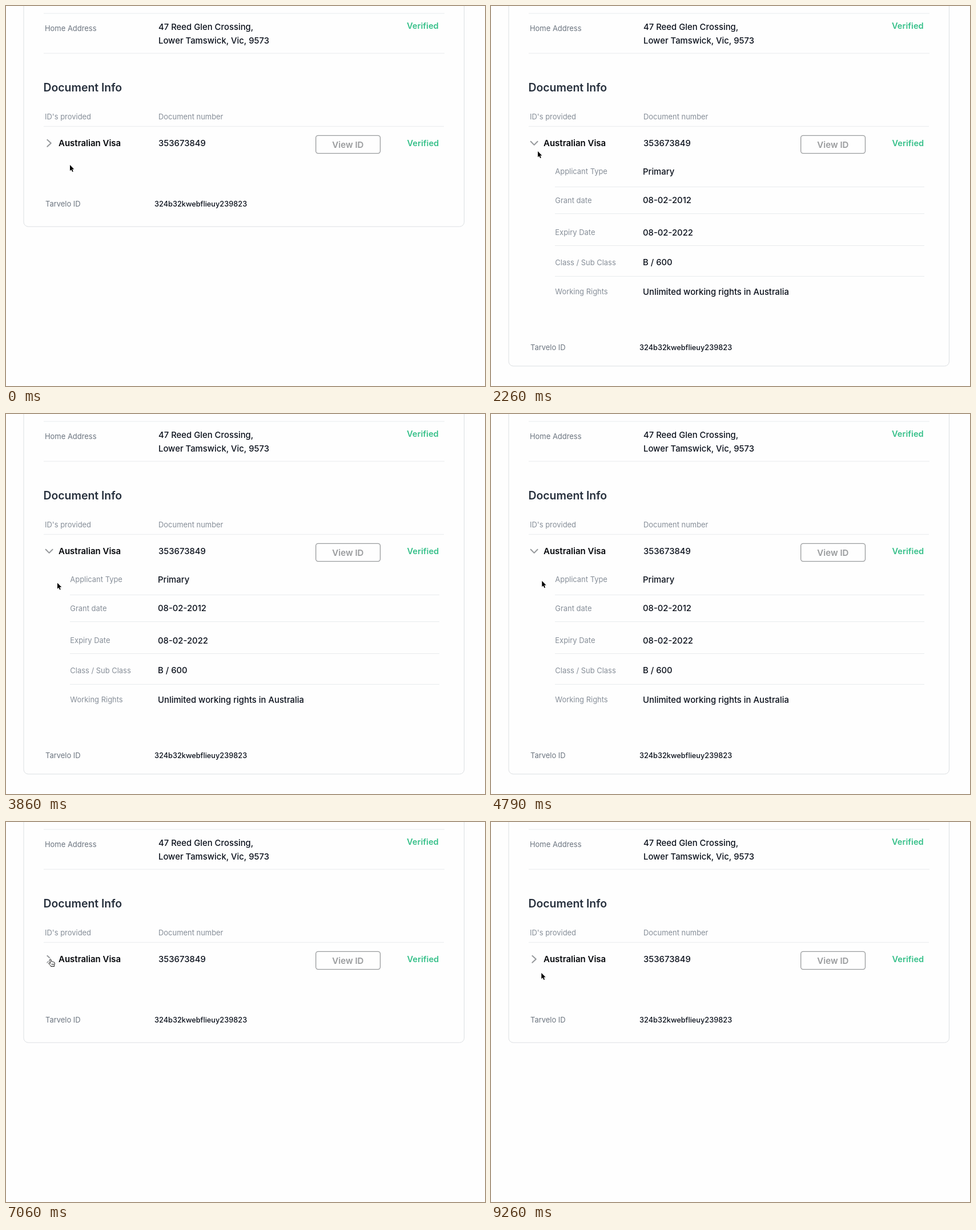
Animation of 839 by 667 pixels, one loop 9.33 s. Source, as an HTML page:

```html
<!DOCTYPE html>
<html lang="en">
<head>
<meta charset="utf-8">
<title>Document info</title>
<style>
  html, body { margin: 0; width: 100%; height: 100%; overflow: hidden; background: #fefefe; }
  svg { display: block; }
  text { font-family: Inter, "Open Sans", sans-serif; white-space: pre; }
  .label { font-size: 12.95px; fill: #868e98; }
  .dark { fill: #6b747f; }
  .value { font-size: 14.85px; font-weight: 500; fill: #0b111c; }
  .code { font-size: 12.75px; font-weight: 500; fill: #0b111c; }
  .name { font-size: 15px; font-weight: 600; fill: #05070b; }
  .title { font-size: 19.4px; font-weight: 600; fill: #262f3c; }
  .ok { font-size: 14.7px; font-weight: 600; fill: #37c08a; }
  .button { font-size: 15.1px; font-weight: 600; fill: #999b9d; }
  .rule { stroke: #e8ebed; fill: none; }
  .chevron { stroke: #96999c; stroke-width: 2; fill: none; stroke-linecap: round; stroke-linejoin: round; }
</style>
</head>
<body>
<svg id="stage" width="839" height="667" viewBox="0 0 839 667"></svg>
<script>
const LOOP = 9330, STEP = LOOP / 140;
const OPEN_AT = 1540, CLOSE_AT = 5860;
const stage = document.getElementById('stage');

function add(parent, tag, attrs, content) {
  const el = document.createElementNS('http://www.w3.org/2000/svg', tag);
  for (const key in attrs) el.setAttribute(key, attrs[key]);
  if (content) el.textContent = content;
  parent.appendChild(el);
  return el;
}
const group = () => add(stage, 'g', {});
const text = (parent, x, y, cls, content) => add(parent, 'text', { x, y, class: cls }, content);
const rule = (parent, x1, x2, y) => add(parent, 'path', { d: `M${x1} ${y}H${x2}`, class: 'rule' });

// Card and fixed content
const card = add(stage, 'rect', {
  x: 31, y: -30, width: 771.5, height: 417.2, rx: 8, fill: '#fefefe', stroke: '#dcdfe2'
});
const page = group();
rule(page, 66, 768, 13);
rule(page, 66, 768, 83);
rule(page, 66, 767, 211.3);
text(page, 68, 43.5, 'label dark', 'Home Address');
text(page, 267, 42, 'value', '47 Reed Glen Crossing,');
text(page, 267, 66, 'value', 'Lower Tamswick, Vic, 9573');
text(page, 702, 40, 'ok', 'Verified');
text(page, 65.5, 149.6, 'title', 'Document Info');
text(page, 68, 199.4, 'label', "ID's provided");
text(page, 267, 199.4, 'label', 'Document number');
text(page, 92, 246, 'name', 'Australian Visa');
text(page, 267, 246, 'value', '353673849');
text(page, 702.5, 245.6, 'ok', 'Verified');
add(page, 'rect', {
  x: 542.7, y: 227.4, width: 112.8, height: 31.2, rx: 4, fill: '#fefefe', stroke: '#999b9d', 'stroke-width': 1.3
});
text(page, 571.3, 249.3, 'button', 'View ID');

const closedMark = add(page, 'path', { d: 'M72.3 234.8L78.8 240.7L72.3 246.8', class: 'chevron' });
const openMark = add(page, 'path', { d: 'M69.6 237.7L75.6 243.9L81.6 237.7', class: 'chevron' });

// Rows shown while expanded
const details = group();
[
  ['Applicant Type', 'Primary', 296],
  ['Grant date', '08-02-2012', 346.3],
  ['Expiry Date', '08-02-2022', 402.5],
  ['Class / Sub Class', 'B / 600', 455.3],
  ['Working Rights', 'Unlimited working rights in Australia', 507]
].forEach(([label, value, y]) => {
  text(details, 112.3, y - 0.6, 'label', label);
  text(details, 266, y, 'value', value);
});
[317.5, 364.5, 420.5, 474.5].forEach(y => rule(details, 112, 759, y));

const footer = group();
text(footer, 69, 351.6, 'label dark', 'Tarvelo ID');
text(footer, 260, 351.6, 'code', '324b32kwebflieuy239823');

// Pointers, both with the hot spot at 0,0
const arrow = add(stage, 'path', {
  d: 'M0 0V10.3L2.4 8.2L4.1 12.1L5.8 11.4L4.1 7.5H7.3Z',
  fill: '#000', stroke: '#fff', 'stroke-width': 1, 'paint-order': 'stroke'
});
const hand = group();
const palm = 'M-1.4 1Q-1.3 0 -.4 0Q.5 0 .8 1L1.6 4.4Q3 3.7 3.7 4.8Q5 4.2 5.6 5.4Q7.2 5.1 7.3 7Q7.4 9.4 6.5 11V13H.6V12Q-1.2 10.4 -2.9 8.1Q-3.6 6.9 -2.6 6.5Q-1.6 6.3 -.3 7.7Z';
add(hand, 'path', { d: palm, stroke: '#fefefe', 'stroke-width': 4, 'stroke-linejoin': 'round' });
add(hand, 'path', { d: palm, fill: '#fff', stroke: '#111', 'stroke-linejoin': 'round' });
add(hand, 'path', { d: 'M2.2 8V10.6M3.8 8V10.6M5.3 8V10.6', stroke: '#111', 'stroke-width': 0.7 });

// Pointer path: time, x, y
const stops = [
  [0, 112, 279], [250, 112, 279],
  [950, 77.5, 239.3], [1900, 77.5, 239.3],
  [2220, 82, 255], [2500, 82, 255],
  [3000, 90, 296.5], [4700, 90, 296.5],
  [5350, 78, 240.6], [8650, 78, 240.6],
  [9200, 88.3, 265], [LOOP, 88.3, 265]
];
function pointerAt(t) {
  const i = Math.max(1, stops.findIndex(s => s[0] >= t));
  const [t0, x0, y0] = stops[i - 1], [t1, x1, y1] = stops[i];
  const k = (t - t0) / (t1 - t0), e = k * k * (3 - 2 * k);
  return [x0 + (x1 - x0) * e, y0 + (y1 - y0) * e];
}

const show = (el, on) => el.setAttribute('visibility', on ? 'visible' : 'hidden');

function draw(time) {
  const t = Math.floor(((time % LOOP) + 8) / STEP) * STEP % LOOP;
  const open = t >= OPEN_AT && t < CLOSE_AT;
  card.setAttribute('height', open ? 662 : 417.2);
  footer.setAttribute('transform', `translate(0 ${open ? 252 : 0})`);
  show(details, open);
  show(openMark, open);
  show(closedMark, !open);

  const [x, y] = pointerAt(t);
  const over = y < 249;
  for (const el of [arrow, hand]) el.setAttribute('transform', `translate(${x} ${y})`);
  show(hand, over);
  show(arrow, !over);
}

const start = performance.now();
function tick() {
  draw(performance.now() - start);
  requestAnimationFrame(tick);
}
draw(0);
requestAnimationFrame(tick);
</script>
</body>
</html>
```
